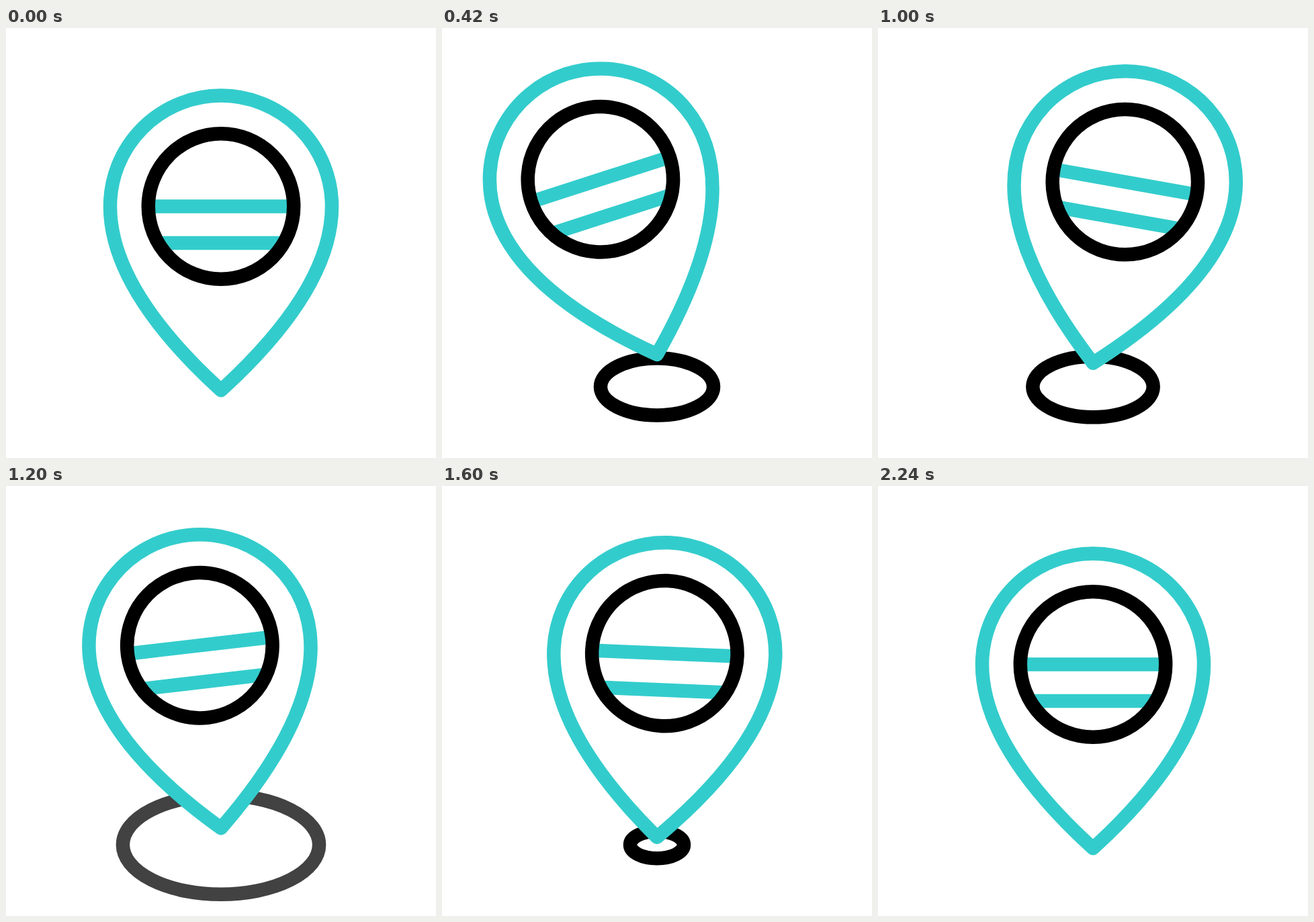
These frames come from a looping animation (640 by 640 pixels, 2.4 s). An HTML page:

```html
<!DOCTYPE html>
<html lang="en">
<head>
<meta charset="utf-8">
<title>Bouncing map pin</title>
<style>
  html, body { margin: 0; height: 100%; overflow: hidden; background: #fff; }
  svg { display: block; width: 100%; height: 100%; fill: none; stroke: #000; stroke-width: 20.5; }
  .teal { stroke: #3cc; }
</style>
</head>
<body>
<svg viewBox="0 0 640 640">
  <ellipse cx="320" cy="534"/>
  <ellipse cx="320" cy="534"/>
  <ellipse cx="320" cy="534"/>
  <g id="pin">
    <path class="teal" fill="#fff" stroke-linejoin="round"
      d="M320 539.3C231 458 155 362 155 265.5a165 165 0 0 1 330 0C485 362 409 458 320 539.3Z"/>
    <path class="teal" d="M212 265.5H428M227 320H413"/>
    <circle cx="320" cy="265.5" r="108.2"/>
  </g>
</svg>
<script>
const LOOP = 2400;
const RIPPLES_END = 2240;
const rippleStarts = [14, 575, 1357];
const lift = [[0, 0], [355, -58.6], [710, 0], [1065, -44.5], [1420, 0], [1790, -34.6], [2145, 0]];
const tilt = [[0, 0], [400, -18.15], [540, -10.15], [740, 7.38], [875, 15.95], [1000, 10.07],
  [1250, -8], [1400, -5.38], [1690, 4], [1820, 2.85], [2150, 0]];

const pin = document.getElementById('pin');
const ripples = document.querySelectorAll('ellipse');

function smooth(x) {
  x = Math.min(1, Math.max(0, x));
  return x * x * (3 - 2 * x);
}

// Slope at a key: flat at the ends and at every turning point.
function slope(keys, i) {
  const a = keys[i - 1], b = keys[i], c = keys[i + 1];
  if (!a || !c || (b[1] - a[1]) * (c[1] - b[1]) <= 0) return 0;
  return (c[1] - a[1]) / (c[0] - a[0]);
}

// Cubic Hermite curve through [time, value] keys.
function curve(keys, t) {
  const i = keys.findIndex(key => key[0] > t);
  if (i < 0) return keys[keys.length - 1][1];
  const [t0, v0] = keys[i - 1], [t1, v1] = keys[i];
  const span = t1 - t0, u = (t - t0) / span;
  return v0 + (v1 - v0) * smooth(u)
    + span * u * (1 - u) * ((1 - u) * slope(keys, i - 1) - u * slope(keys, i));
}

function draw(t) {
  pin.setAttribute('transform',
    `translate(0 ${curve(lift, t)}) rotate(${curve(tilt, t)} 320 539.3)`);
  ripples.forEach((ripple, i) => {
    const age = t - rippleStarts[i];
    const rx = 8 + 176.6 * smooth(age / 895);
    ripple.setAttribute('rx', rx);
    ripple.setAttribute('ry', rx * 0.505);
    ripple.setAttribute('opacity', age < 0 || t >= RIPPLES_END ? 0 : 1 - smooth((age - 481) / 432));
  });
}

let start;
function tick(now) {
  start ??= now;
  draw((now - start) % LOOP);
  requestAnimationFrame(tick);
}
draw(0);
requestAnimationFrame(tick);
</script>
</body>
</html>
```
